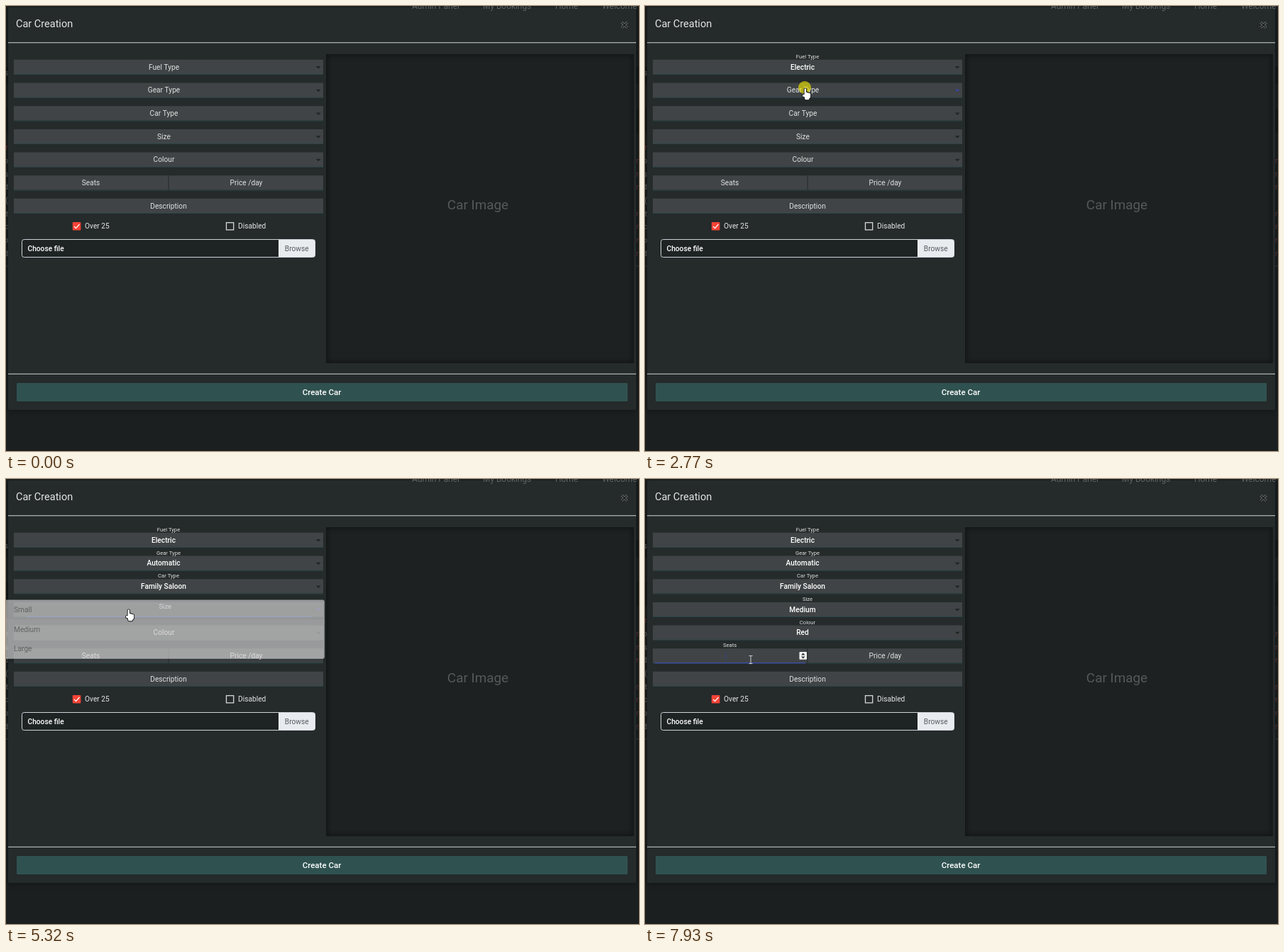
Animation of 892 by 628 pixels, one loop 8 s. Source, as an HTML page with a canvas:

```html
<!DOCTYPE html>
<html lang="en">
<head>
<meta charset="utf-8">
<title>Car Creation</title>
<style>
html, body { margin: 0; width: 100%; height: 100%; overflow: hidden; background: #1b1f20; }
canvas { display: block; }
</style>
</head>
<body>
<canvas id="stage" width="892" height="628"></canvas>
<script>
const ctx = document.getElementById('stage').getContext('2d');
const LOOP = 8000, STEP = 79.3, PITCH = 32.7, ROW = 30.5;
const INDIGO = '#3f4fb5', INK = '#dfe1e1';
const SEATS = { focus: 7740, y: 249.4 };

// focus, select: click times in ms; tip: where the pointer clicks the field
const fields = [
  { name: 'Fuel Type', focus: 1585, select: 2290, tip: [222, 86], pick: 1,
    items: ['Hybrid', 'Electric', 'Diesel', 'Petrol'] },
  { name: 'Gear Type', focus: 2755, select: 3270, tip: [225, 115], pick: 0,
    items: ['Automatic', 'Manual'] },
  { name: 'Car Type', focus: 3815, select: 4750, tip: [163, 155], pick: 0,
    items: ['Family Saloon', 'Hatchback', 'Estate', 'Convertible', 'Minivan'] },
  { name: 'Size', focus: 5175, select: 5800, tip: [172, 183], pick: 1,
    items: ['Small', 'Medium', 'Large'] },
  { name: 'Colour', focus: 6260, select: 6950, tip: [194, 215], pick: 0,
    items: ['Red', 'Blue', 'Green', 'Black', 'White', 'Silver'] }
];
fields.forEach((f, i) => {
  f.y = 86 + PITCH * i;
  f.open = f.focus + 110;
  f.close = f.select + 60;
  f.blur = (fields[i + 1] || SEATS).focus;
});

const stops = [
  { t: -180, x: 791, y: 585 },
  { t: 480, x: 388, y: 346 },
  ...fields.flatMap(({ focus, select, pick, tip: [x, y] }) =>
    [{ t: focus, x, y }, { t: select, x, y: y + pick * 20 }]),
  { t: 7290, x: 194, y: 215 },
  { t: SEATS.focus, x: 149, y: 255 }
];

const clamp = v => Math.max(0, Math.min(1, v));
const easeOut = v => 1 - (1 - clamp(v)) ** 3;
const mix = (a, b, p) => a + (b - a) * p;

// the pointer rests after each click and arrives just before the next
function pointer(t) {
  const next = stops.findIndex(s => s.t > t);
  if (next < 0) return stops[stops.length - 1];
  const a = stops[next - 1], b = stops[next];
  const from = Math.max(a.t + 250, b.t - 700), to = b.t - 90;
  const u = clamp((t - from) / (to - from));
  const p = u * u * (3 - 2 * u);
  return { x: mix(a.x, b.x, p), y: mix(a.y, b.y, p) };
}

function rect(x, y, w, h, color, r = 0) {
  ctx.fillStyle = color;
  ctx.beginPath();
  ctx.roundRect(x, y, w, h, r);
  ctx.fill();
}

function line(color, width, ...points) {
  ctx.strokeStyle = color;
  ctx.lineWidth = width;
  ctx.beginPath();
  points.forEach(([x, y], i) => i ? ctx.lineTo(x, y) : ctx.moveTo(x, y));
  ctx.stroke();
}

// y is the middle of the capitals
function text(s, x, y, color, { size = 10.2, weight = 400, align = 'center' } = {}) {
  ctx.font = `${weight} ${size}px Roboto, sans-serif`;
  ctx.textAlign = align;
  ctx.fillStyle = color;
  ctx.fillText(s, x, y + size * 0.355);
}

// h > 0 points down, h < 0 points up
function triangle(x, y, w, h, color) {
  ctx.fillStyle = color;
  ctx.beginPath();
  ctx.moveTo(x - w / 2, y);
  ctx.lineTo(x + w / 2, y);
  ctx.lineTo(x, y + h);
  ctx.fill();
}

function page() {
  rect(0, 0, 892, 628, '#1b1f20');
  for (const x of [0, 888]) {
    rect(x, 86, 4, 24, '#141919');
    rect(x, 145, 4, 34, '#141819');
    rect(x, 366, 4, 2, '#2a2f30');
  }
  text('s', 3, 94, '#666a6b', { align: 'right' });
  [...'rosd(tcod'].forEach((s, i) => {
    const y = 199.6 + i * 18.7;
    text(s, 3, y, i ? '#666a6b' : '#65302f', { align: 'right' });
    if (i % 4 || i === 8) text('r', 888, y, '#67393b', { align: 'left' });
  });

  ctx.save();
  ctx.shadowColor = 'rgba(0,0,0,.45)';
  ctx.shadowBlur = 8;
  rect(3, 2, 885, 568, '#252a2b', 2);
  ctx.restore();
  rect(0, 0, 892, 2, '#1b1f20');
  const nav = { Admin_Panel: 572, My_Bookings: 672, Home: 774, Welcome: 840 };
  for (const s in nav)
    text(s.replace('_', ' '), nav[s], -0.5, '#5f6465', { size: 11.9, align: 'left' });
}

function cross(x, y) {
  for (const [color, width] of [['#747878', 3.2], ['#15191a', 1.5]])
    for (const s of [-1, 1])
      line(color, width, [x - 4, y - 3.8 * s], [x + 4, y + 3.8 * s]);
}

function modal() {
  text('Car Creation', 14, 24.4, '#e4e6e6', { size: 14.5, align: 'left' });
  cross(871.5, 26.8);
  rect(3, 51.3, 885, 1, '#cfd3d3');
  rect(3, 518.7, 885, 1, '#cfd3d3');
  rect(15, 532, 861, 26, '#2f5250', 1.5);
  text('Create Car', 445, 545, '#fff', { size: 11.5, weight: 500 });

  ctx.save();
  ctx.beginPath();
  ctx.rect(451, 68, 433.5, 436);
  ctx.clip();
  rect(451, 68, 433.5, 436, '#1d2122');
  ctx.shadowColor = '#000';
  ctx.shadowBlur = 7;
  ctx.strokeStyle = '#101415';
  ctx.lineWidth = 2;
  ctx.strokeRect(450.5, 67.5, 434.5, 437);
  ctx.restore();
  text('Car Image', 665, 280, '#55595a', { size: 18.9 });
}

function box(x, y, w) {
  rect(x, y - 10.2, w, 20.4, '#404446');
  rect(x, y + 10, w, 1, '#284447');
}

function label(name, x, toX, y, p) {
  text(name, mix(x, toX, p), mix(y, y - 14.8, p), INK, { size: mix(10.2, 7.65, p) });
}

function focusLine(x, y, w, since) {
  const p = easeOut(since / 300), len = w * mix(0.5, 1, p);
  ctx.globalAlpha = p ** 1.6;
  rect(x + (w - len) / 2, y + 9.6, len, 1.2, INDIGO);
  ctx.globalAlpha = 1;
}

function selectField(f, t) {
  const focused = t >= f.focus && t < f.blur;
  box(11, f.y, 436);
  triangle(440.2, f.y - 1, 7, 3.5, focused ? '#39469a' : '#202526');
  if (focused) focusLine(11, f.y, 436, t - f.focus);
  label(f.name, 222.5, 229, f.y, easeOut((t - f.open + 12) / 400));
  if (t >= f.close) text(f.items[f.pick], 222, f.y, '#fff', { weight: 500 });
}

function seatsField(t) {
  const { y, focus } = SEATS;
  box(11, y, 217.5);
  label('Seats', 119.5, 119.5, y, easeOut((t - focus) / 190));
  if (t < focus - 100) return;
  rect(217.5, y - 5.4, 10.5, 10.8, '#f2f3f3', 1);
  for (const s of [-1, 1]) triangle(222.8, y + s, 5.6, 3 * s, '#303536');
  if (t < focus) return;
  focusLine(11, y, 217.5, t - focus);
  rect(113.6, y - 5, 1, 10, '#39458a');
}

function lowerForm() {
  box(229.5, SEATS.y, 217.5);
  text('Price /day', 338.5, SEATS.y, INK);
  box(11, 282, 436);
  text('Description', 229, 282, INK);

  rect(93.8, 305, 11.6, 11.6, '#f44336', 1);
  line('#fff', 1.2, [96, 311], [98.6, 313.6], [103.5, 308]);
  text('Over 25', 111, 310.7, '#e4e6e6', { align: 'left' });
  ctx.strokeStyle = '#d5d8d8';
  ctx.lineWidth = 1.3;
  ctx.strokeRect(310.5, 305.7, 10.2, 10.2);
  text('Disabled', 327, 310.7, '#e4e6e6', { align: 'left' });

  ctx.fillStyle = '#1e2324';
  ctx.strokeStyle = '#ced4da';
  ctx.lineWidth = 1;
  ctx.beginPath();
  ctx.roundRect(22.5, 329.5, 413, 25, 3);
  ctx.fill();
  ctx.stroke();
  rect(384, 330, 51.5, 24, '#e9ecef', [0, 2, 2, 0]);
  text('Choose file', 30.5, 342, '#fff', { weight: 500, align: 'left' });
  text('Browse', 409.7, 342, '#565c62');
}

function menu(f, t, at) {
  const closing = clamp((t - f.close) / 100);
  if (t < f.open || closing === 1) return;
  const p = easeOut((t - f.open) / 120);
  const scale = mix(0.8, 1, p), w = mix(436.5, 459, p) + 4;
  const top = f.y - 15 * scale, h = ROW * scale;
  const hover = Math.floor((at.y - top) / h);
  ctx.save();
  ctx.globalAlpha = p * (1 - closing);
  ctx.shadowColor = 'rgba(0,0,0,.4)';
  ctx.shadowBlur = 5;
  ctx.shadowOffsetY = 2;
  rect(-4, top, w, h * f.items.length, '#fff', 3);
  ctx.shadowColor = 'transparent';
  f.items.forEach((s, i) => {
    if (i === 0 || i === hover) rect(-4, top + i * h, w, h, 'rgba(0,0,0,.045)');
    text(s, 11, top + (i + 0.5) * h - 0.2, '#303030', { align: 'left' });
  });
  ctx.restore();
}

function halo(t, { x, y }) {
  const pressed = fields.some(f => [f.focus, f.select].some(c => t >= c && t < c + 75));
  if (!pressed) return;
  ctx.fillStyle = 'rgba(252,240,0,.6)';
  ctx.beginPath();
  ctx.arc(x, y, 9, 0, Math.PI * 2);
  ctx.fill();
}

// dark silhouette first, white on top leaves an outline
function hand() {
  ctx.translate(0.8, 0.7);
  for (const [grow, color] of [[0.9, '#111'], [0, '#fff']]) {
    const part = (x, y, w, h) =>
      rect(x - grow, y - grow, w + 2 * grow, h + 2 * grow, color, 1.4 + grow);
    part(-1.2, 0.6, 2.4, 12);
    for (let i = 0; i < 3; i++) part(0.6 + i * 2.1, 6 + i * 0.7, 2.6, 6);
    part(-1.2, 9, 8.3, 5.5);
    part(-3.8, 9.4, 3.6, 3);
    part(-0.6, 12, 6.2, 4.6);
  }
}

function beam() {
  for (const y of [-5.5, 5.5]) line('#c9cccc', 1, [-2.5, y], [2.5, y]);
  line('#c9cccc', 1, [0, -5.5], [0, 5.5]);
}

function arrow() {
  line('#111', 3, [4, 9], [6.4, 15]);
  line('#fff', 1.6, [4, 9], [6.2, 14.6]);
  ctx.beginPath();
  ctx.moveTo(0, 0);
  ctx.lineTo(0, 13);
  ctx.lineTo(9.4, 9.6);
  ctx.closePath();
  ctx.fillStyle = '#fff';
  ctx.fill();
  ctx.strokeStyle = '#111';
  ctx.lineWidth = 0.8;
  ctx.stroke();
}

function cursor(t, { x, y }) {
  if (t < 70) return;
  ctx.save();
  ctx.translate(x, y);
  if (t > SEATS.focus - 100) beam();
  else if (t > fields[0].focus - 180) hand();
  else arrow();
  ctx.restore();
}

function draw(now) {
  // the picture advances in even steps
  const t = Math.floor((now % LOOP + 10) / STEP) * STEP;
  const at = pointer(t);
  page();
  modal();
  fields.forEach(f => selectField(f, t));
  seatsField(t);
  lowerForm();
  fields.forEach(f => menu(f, t, at));
  halo(t, at);
  cursor(t, at);
}

const start = performance.now();
function tick() {
  draw(performance.now() - start);
  requestAnimationFrame(tick);
}
tick();
</script>
</body>
</html>
```
